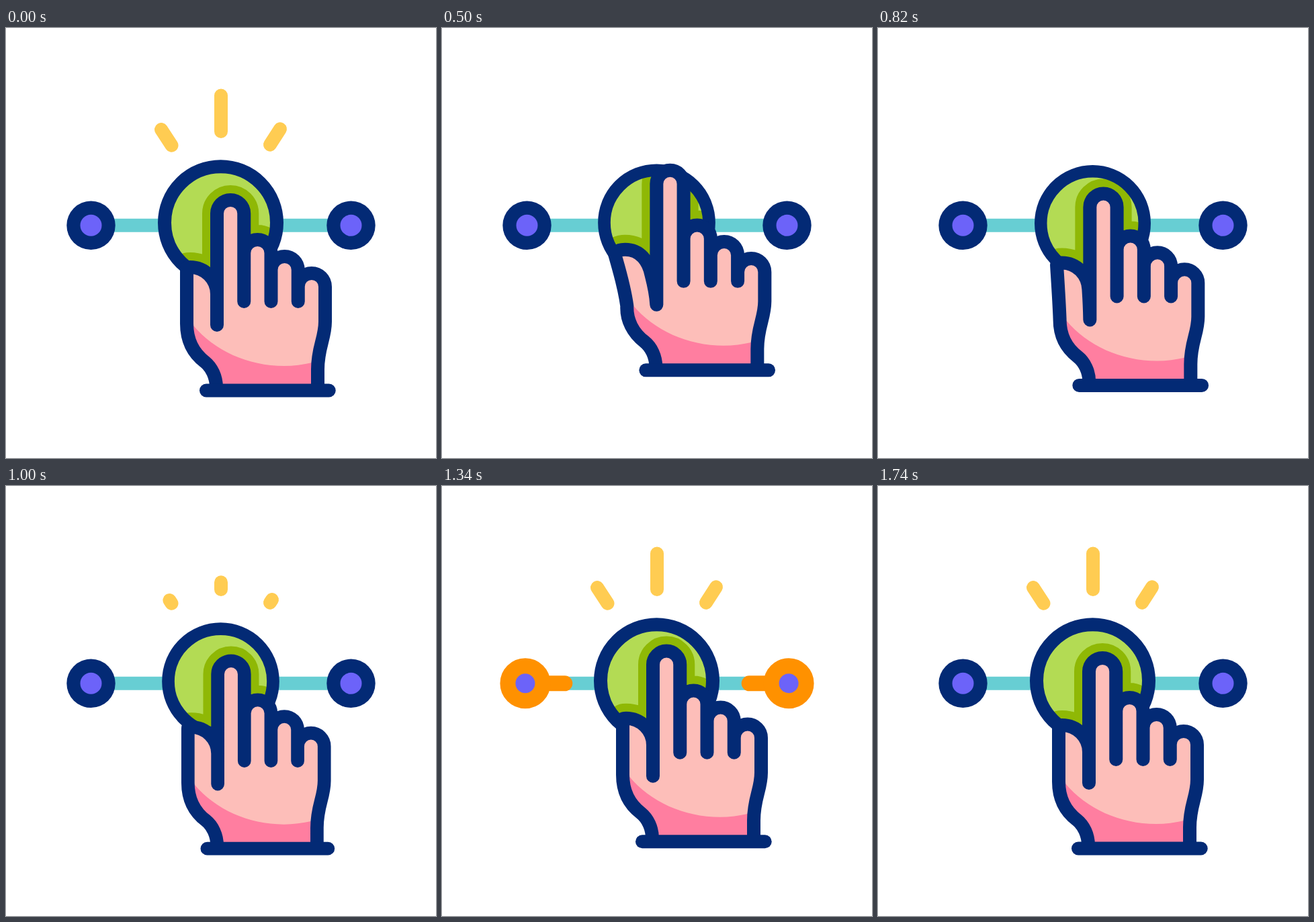
An HTML page for the animation above (2.2 s loop, 640 px wide and 640 px high).

```html
<!DOCTYPE html>
<html lang="en">
<head>
<meta charset="utf-8">
<title>Touch slider</title>
<style>
  html, body { margin: 0; width: 100%; height: 100%; overflow: hidden; background: #fff; }
  svg { display: block; width: 100vw; height: 100vh; }
  .navy { fill: #032a75; }
  .purple { fill: #6c63f9; }
  .outline { fill: none; stroke: #032a75; stroke-width: 20; stroke-linecap: round; stroke-linejoin: round; }
  .shadow { fill: #8fb805; stroke: #8fb805; stroke-width: 44; stroke-linejoin: round; }
  .ray { stroke: #ffcc52; stroke-width: 20; stroke-linecap: round; }
  .rail { stroke: #67ced3; stroke-width: 20; }
  .pulse { stroke: #ff9100; stroke-width: 23; stroke-linecap: round; }
  .glow { fill: none; stroke: #ff9100; stroke-width: 23; }
</style>
</head>
<body>
<svg viewBox="0 0 640 640">
  <defs>
    <clipPath id="disc"><circle id="discClip" cx="319.5" r="76"/></clipPath>
    <clipPath id="skin"><path data-hand/></clipPath>
  </defs>
  <line class="ray" data-ray="320 154 320 100.5"/>
  <line class="ray" data-ray="246.5 174.7 231 151"/>
  <line class="ray" data-ray="393 173.7 408 150.3"/>
  <line class="rail" id="rail" y1="293.8" y2="293.8"/>
  <line class="pulse" data-side="-1" y1="293.8" y2="293.8"/>
  <line class="pulse" data-side="1" y1="293.8" y2="293.8"/>
  <g class="node" data-side="-1"><circle class="navy" r="36.2"/><circle class="purple" r="16"/><circle class="glow" r="26"/></g>
  <g class="node" data-side="1"><circle class="navy" r="36.2"/><circle class="purple" r="16"/><circle class="glow" r="26"/></g>
  <g id="button"><circle r="83.5" fill="#b3db54"/></g>
  <g clip-path="url(#disc)"><g data-pose><path class="shadow" data-hand/></g></g>
  <g id="rim"><circle class="outline" r="83.5"/></g>
  <g data-pose>
    <path data-hand fill="#fdbeb9"/>
    <path clip-path="url(#skin)" fill="#ff7ea0"
      d="M262 420 C268 430 274 437 279 443 C310 480 360 503 414 503 C428 503 442 501 456 498 L480 492 V545 H262Z"/>
    <path class="outline" data-hand/>
    <path class="outline" d="M298 539.5 H480.7"/>
  </g>
</svg>
<script>
const LOOP = 2200;
const MID = 320;
const REACH = 193.5;   // distance of each node from the middle
const ONSET = 60;      // where pulses start, hidden under the button

const all = q => [...document.querySelectorAll(q)];
const byId = id => document.getElementById(id);
const set = (el, attrs) => { for (const k in attrs) el.setAttribute(k, attrs[k]); };
const mix = (a, b, u) => a + (b - a) * u;
const smooth = u => u * u * (3 - 2 * u);

// Eased value of a [time, value] table.
function track(keys, t) {
  if (t <= keys[0][0]) return keys[0][1];
  for (let i = 1; i < keys.length; i++) {
    const [t0, a] = keys[i - 1], [t1, b] = keys[i];
    if (t < t1) return mix(a, b, smooth((t - t0) / (t1 - t0)));
  }
  return keys[keys.length - 1][1];
}

const tracks = {
  lift: [[60, 0], [550, 1], [950, 0]],
  kick: [[1020, 0], [1160, 19.2], [1540, 0]],
  squash: [[950, 1], [1040, 0.975], [1220, 1]],
  button: [[60, 1], [600, 0.928], [820, 0.925], [970, 0.92], [1150, 1.098], [1330, 1]],
  sink: [[560, 0], [820, 0.8], [960, 1], [1120, 0]],
  spread: [[1030, 0], [1200, 33.5], [1370, 0]],
  glow: [[1110, 0], [1200, 1], [1500, 1], [1740, 0]],
  head: [[1060, 0], [1190, 1]],
  tail: [[1232, 0], [1432, 1]],
  rayOut: [[240, 0], [470, 1]]
};

// Hand outline; p runs from relaxed (0) to stretched (1).
function handPath(p) {
  const m = (a, b) => mix(a, b, p).toFixed(2);
  const pt = (x0, y0, x1, y1) => `${m(x0, x1)} ${m(y0, y1)} `;
  const tips = [276 - 14.5 * p ** 1.5, 335 + 9 * p, 360 + 8.5 * p, 385 + 8.5 * p];
  let d = 'M313 535 C313 519 306 505 296 497 C279 484 269 465 ' + pt(269, 440, 270, 444);
  d += 'C' + pt(269, 415, 266, 415) + pt(269, 385, 258, 390) + pt(269, 358, 251.5, 368);
  d += 'C' + pt(269, 356, 256, 360) + pt(271, 356, 262, 360) + pt(274, 356, 267, 360);
  d += 'C' + pt(296, 356, 290, 360) + pt(314, 374, 302, 378) + pt(314, 396, 306, 398);
  d += 'C' + pt(314, 411, 310, 413) + pt(314, 425, 313, 425) + '314 442 ';
  tips.forEach((y, i) => {
    if (i) d += 'V407 ';
    d += `V${y} A20.125 20.125 0 0 1 ${314 + 40.25 * (i + 1)} ${y} `;
  });
  return d + 'V437 C475 462 464 475 464 508 V535';
}

const hands = all('[data-hand]'), poses = all('[data-pose]');
const rays = all('.ray').map(el => ({ el, ends: el.dataset.ray.split(' ').map(Number) }));
const nodes = all('.node'), pulses = all('.pulse'), glows = all('.glow');

function drawRays(t, out) {
  const grow = Math.min(1, Math.max(0, (t - 980) / 200));
  const [from, to] = t < 980 ? [out, 1] : [0, 1 - (1 - grow) ** 2];
  for (const { el, ends: [x0, y0, x1, y1] } of rays) {
    set(el, {
      x1: mix(x0, x1, from), y1: mix(y0, y1, from),
      x2: mix(x0, x1, to), y2: mix(y0, y1, to),
      visibility: to - from > 0.001 ? 'visible' : 'hidden'
    });
  }
}

function draw(t) {
  const v = {};
  for (const name in tracks) v[name] = track(tracks[name], t);

  const d = handPath(v.lift);
  hands.forEach(el => set(el, { d }));
  const dx = 5.5 * v.lift, dy = -31 * v.lift - v.kick;
  const pose = `translate(${389.5 + dx} ${549 + dy}) scale(${v.squash}) translate(-389.5 -549)`;
  poses.forEach(el => set(el, { transform: pose }));

  const cy = 289.8 + v.sink;
  const place = `translate(319.5 ${cy}) scale(${v.button})`;
  set(byId('button'), { transform: place });
  set(byId('rim'), { transform: place });
  set(byId('discClip'), { cy, r: 76 * v.button });

  const reach = REACH + v.spread;
  set(byId('rail'), { x1: MID - reach, x2: MID + reach });
  nodes.forEach(el => set(el, { transform: `translate(${MID + el.dataset.side * reach} 293.8)` }));
  glows.forEach(el => set(el, { opacity: v.glow }));
  pulses.forEach(el => set(el, {
    x1: MID + el.dataset.side * mix(ONSET, reach, v.tail),
    x2: MID + el.dataset.side * mix(ONSET, reach, v.head),
    visibility: v.head > 0 && v.tail < 1 ? 'visible' : 'hidden'
  }));

  drawRays(t, v.rayOut);
}

const start = performance.now();
function tick() {
  draw((performance.now() - start) % LOOP);
  requestAnimationFrame(tick);
}
tick();
</script>
</body>
</html>
```
